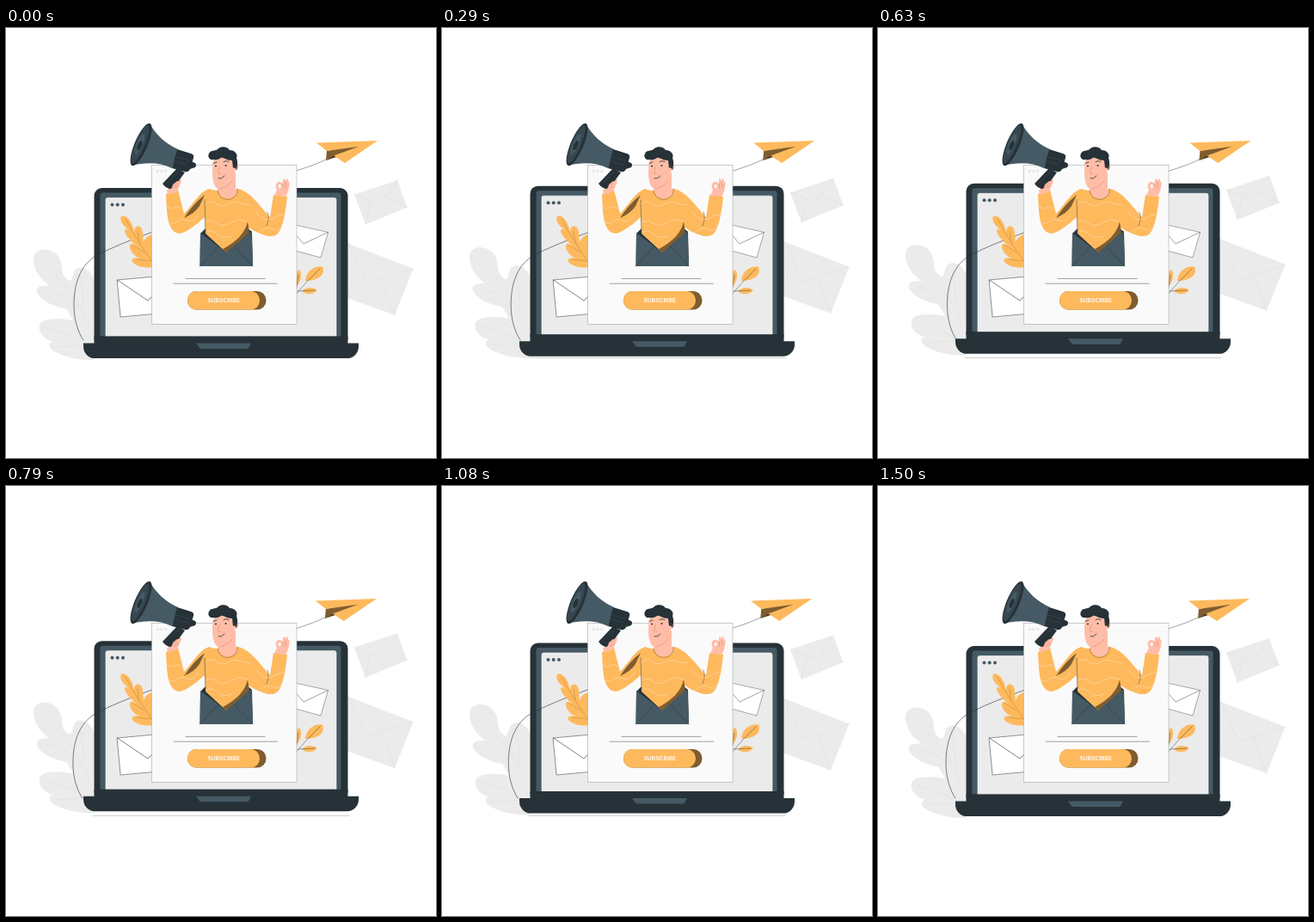
Animation, 500 px wide and 500 px high, one loop 1540 ms. Source, as an HTML page:

```html
<!DOCTYPE html>
<html lang="en">
<head>
<meta charset="utf-8">
<title>Subscribe</title>
<style>
  html, body { margin: 0; width: 100%; height: 100%; overflow: hidden; background: #fff; }
  svg { display: block; width: 100%; height: 100%; }
  path, line { stroke-linecap: round; stroke-linejoin: round; }
  .line { fill: none; stroke: #263238; stroke-width: .6; }
  .fine { fill: none; stroke: #263238; stroke-width: .45; }
  .dark { fill: #263238; }
  .slate { fill: #455a64; }
  .grey { fill: #ebebeb; }
  .vein { fill: none; stroke: #e0e0e0; stroke-width: .6; }
  .orange { fill: #feb95d; }
  .brown { fill: #7f5d2f; }
  .skin { fill: #ffbda7; }
  .fold { fill: none; stroke: #d97d6d; stroke-width: .5; }
  .knit { fill: none; stroke: #ffdcae; stroke-width: .65; }
  .paper { fill: #fff; stroke: #263238; stroke-width: .5; }
  text { font: 600 6.7px Inter, Arial, sans-serif; fill: #fff; text-anchor: middle; }
</style>
</head>
<body>
<svg viewBox="0 0 500 500">
  <line x1="101" y1="383.4" x2="399" y2="383.4" stroke="#b5babd" stroke-width=".7"/>

  <g id="laptop">
    <!-- background plants and envelopes -->
    <path class="grey" d="M32 270C31 261 38 256 46 257C57 258 65 266 65 280C66 288 69 291 74 294C79 292 76 279 86 278C94 278 100 284 103 292V385C91 387 70 383 57 376C50 372 48 366 55 364C48 363 41 358 39 351C37 343 43 338 54 338C64 337 71 338 78 340C75 334 73 330 70 326C56 324 41 316 37 309C33 302 38 298 51 299C39 291 33 281 32 270Z"/>
    <path class="vein" d="M43 270C62 290 85 315 97 348M46 306Q66 308 83 322M87 288Q90 306 90 326M46 348Q74 353 102 374M58 370Q75 370 91 368"/>
    <path class="grey" d="M405 193L455 176.500L466.500 208L418 228Z"/>
    <path class="vein" d="M405 193L435 204L455 176.500M418 228L424 200M466.500 208L441 196"/>
    <path class="grey" d="M390 247L473.500 279.500L452 333.500L390 311Z"/>
    <path class="vein" d="M398 250L420 297L473.500 279.500M452 333.500L437 292M398 305L413 282"/>

    <rect class="dark" x="102.500" y="185.500" width="295" height="184" rx="9"/>
    <path class="slate" d="M109.500 358V194Q109.500 191 112.500 191H386.500Q389.500 191 389.500 194V358Z"/>
    <path class="grey" stroke="#f4f4f4" stroke-width=".7" d="M116 358V199Q116 197 118 197H382Q384 197 384 199V358Z"/>
    <path class="dark" d="M90 366H410V370A13.500 13.500 0 0 1 396.500 383.500H103.500A13.500 13.500 0 0 1 90 370ZM102.500 358H397.500V367H102.500Z"/>
    <path class="slate" d="M221 366H285L281.500 372.500H227Q225 372 224 370Z"/>
    <g class="slate">
      <circle cx="123.500" cy="205" r="2"/><circle cx="129.700" cy="205" r="2"/><circle cx="136" cy="205" r="2"/>
    </g>
  </g>

  <g id="plane">
    <path class="line" d="M172 236.500C147 246 120 256 103 266C86 277 79 298 79 322C79 340 84 354 90 363"/>
    <path class="fine" d="M336 166.500C350 162 362 158 373 152.500"/>
    <path class="brown" d="M372 154L373 143L415 134L411 139L381 149Z"/>
    <path class="orange" d="M361 133.500L432 131L412 137.500L373 143ZM432 131L394 157L381 148.500L411 137.500Z"/>
    <path d="M372 154L381 148.500L384 150Z" fill="#4c3819"/>
  </g>

  <!-- items inside the screen -->
  <path class="orange" d="M133.500 220C136 215 144 221 147 230C148 233 148 236 149 237C149 231 153 229 157 232C160 237 159 244 160 249C163 242 168 240 172 240V278C162 280 150 277 146.500 271C146 267 150 267 155 268C149 265 143 258 144 253C145 249 149 252 152 254C146 248 139 242 138 236C138 233 141 234 144 236C137 231 132 225 133.500 220Z"/>
  <path fill="none" stroke="#9d7131" stroke-width=".4" d="M139 222Q151 245 171 273M153 236L155 249M147 252L161 261M152 269L169 271"/>
  <path class="paper" d="M129.500 293L195 287L198 330L133.500 336Z"/>
  <path class="line" d="M129.500 293L165 317L195 287"/>
  <path class="paper" style="stroke-width:.4" d="M325 226.500L374.500 237.500L366 267L318 254Z"/>
  <path class="fine" d="M325 226.500L346 251L374.500 237.500"/>
  <path class="orange" d="M348 294C349 283 358 276 368 277.500C372 287 363 294 348 294ZM337 302C334 294 336 283 341 281C345 286 343 296 337 302ZM344 306C349 301 357 301 362 305C358 310 349 311 344 306Z"/>
  <path class="fine" d="M335 312Q349 295 365 280M339 306L359 305M337 307L340 287"/>

  <!-- card -->
  <rect x="169.500" y="159.500" width="168.500" height="185" fill="#fafafa" stroke="#a5abae" stroke-width=".6"/>
  <g fill="none" stroke="#d0d0d0" stroke-width=".6">
    <circle cx="176" cy="166.500" r="1.200"/><circle cx="180.800" cy="166.500" r="1.200"/><circle cx="185.600" cy="166.500" r="1.200"/>
  </g>
  <path class="fine" d="M209 291.400H301M195 297.200H315.500"/>
  <rect class="brown" x="211" y="306" width="91.500" height="21.500" rx="10.500"/>
  <rect class="orange" x="211" y="306" width="84" height="21.500" rx="10.500"/>
  <text x="253.300" y="318.800">SUBSCRIBE</text>

  <!-- envelope and sweater -->
  <path class="dark" d="M226 239L233 232H280L286 237L287 277H225.500Z"/>
  <path class="orange" d="M186 193L200 188L207 216C217 206 224 191 236 187C247 191 261 190 270 187C284 190 296 208 307 220L311 194L327 196C325 215 322 233 316 239C309 246 295 240 282 232L280 240L256 261L232 239L231 220C221 229 209 238 202 239C187 238 187 215 186 193Z"/>
  <path class="brown" d="M231 194Q217 205 207 221Q220 215 225 207ZM281 225Q277 244 252 257L256 261L283 238Z"/>
  <path class="slate" d="M226 238L256 261L285.500 236L287 277H225.500Z"/>
  <path class="fine" d="M225.500 277L247 254M287 277L265 253.500M231 200L232 237M304 214Q307 221 303 230"/>
  <path class="knit" d="M187 207Q191 212 195 209T205 210M188 225Q194 229 199 225T211 224T224 217M232 205Q238 199 244 204T258 205T271 203T285 206M232 226Q239 222 245 227T260 227T273 223T281 225M291 213Q297 223 303 223T313 220T325 217M296 236Q305 230 311 234T321 229M233 237Q240 234 246 240T263 242"/>

  <!-- head -->
  <path class="skin" d="M247 180L267 168V187Q272 193 264 197Q252 203 246 189Z"/>
  <path fill="none" stroke="#8d662f" stroke-width=".6" d="M246 189C247 199 258 202 265 197Q270 193 269 187"/>
  <path class="skin" d="M241 155C239 168 240 182 245 186C251 190 262 184 266 174V166C272 166 271 157 267 158L264 149H244Z"/>
  <path class="fold" d="M249 187Q259 184 263 178"/>
  <path class="dark" d="M241 153C237 154 234 150 236 146C238 141 244 144 247 140C251 137 258 138 260 142C267 142 270 148 268 151C270 156 269 162 268 165Q266 161 264 163L263 154C256 154 253 150 250 151Q246 154 241 153Z"/>
  <path fill="none" stroke="#263238" stroke-width=".8" d="M241 157.500L245 156M253 155.500Q256 153.500 259 155.500M247 175Q251 176 254 172"/>
  <path class="fold" d="M248 161L246.500 169L250 169.500M267 160L269 162"/>
  <circle class="dark" cx="244" cy="160.500" r="1"/><circle class="dark" cx="255.500" cy="160" r="1"/>

  <!-- left hand and megaphone -->
  <path class="skin" d="M188 193L189 184Q191 175 199 174Q206 175 203 181L199 189Z"/>
  <path class="dark" d="M199 163L208 168L194 187Q187 188 182 181Z"/>
  <path class="slate" d="M167 111C174 124 186 135 200 141L193 163C179 156 162 156 146 160Z"/>
  <g transform="rotate(23 157 135.500)">
    <ellipse class="dark" cx="157" cy="135.500" rx="7.500" ry="26.500"/>
    <ellipse cx="156" cy="135.500" rx="5.500" ry="23.500" fill="#37474f"/>
    <ellipse class="slate" cx="155.500" cy="135.500" rx="3.500" ry="13"/>
    <ellipse class="dark" cx="156" cy="137" rx="2.400" ry="6"/>
  </g>
  <path class="dark" d="M199 141L215 146Q219 147 218 151L214 164Q212 168 208 167L193 163Z"/>
  <path class="dark" d="M215 155L220 157Q222 159 220 162L214 164Z"/>
  <path fill="none" stroke="#455a64" stroke-width=".4" d="M197 150L213 154M196 155L211 159M187 180L200 168"/>
  <path class="skin" d="M187 188Q193 189 194 182L199 178Q204 178 201 184L199 190L188 194Z"/>
  <path class="fold" d="M194 183L199 181M195 186L200 184"/>

  <!-- right hand -->
  <path class="skin" d="M312 195L315 188Q312 184 315 180Q318 177 322 181L322 176Q324 174 325 178L326 175Q328 175 328 179Q330 178 329.500 182Q329 190 325 196Z"/>
  <ellipse cx="318.200" cy="184" rx="1.700" ry="2.300" fill="#fafafa"/>
  <path class="fold" d="M322 181L323 187M325 179L326 186"/>
</svg>
<script>
  const LOOP = 1540, CYCLE = 1500, UNIT = 0.625, REST_Y = 0.6;
  const shakeStops = [0, -1, 2, -4, 4, -4, 4, -4, 2, -1, 0];
  const laptop = document.getElementById("laptop");
  const plane = document.getElementById("plane");

  function shake(p) {
    const pos = p * 10, i = Math.min(Math.floor(pos), 9);
    return shakeStops[i] + (shakeStops[i + 1] - shakeStops[i]) * (pos - i);
  }

  function draw(now) {
    const p = Math.min((now % LOOP) / CYCLE, 1);
    const lift = 10 * (1 - Math.abs(2 * p - 1));
    laptop.setAttribute("transform", `translate(0 ${REST_Y - lift * UNIT})`);
    plane.setAttribute("transform", `translate(${shake(p) * UNIT} 0)`);
    requestAnimationFrame(draw);
  }

  draw(performance.now());
</script>
</body>
</html>
```
